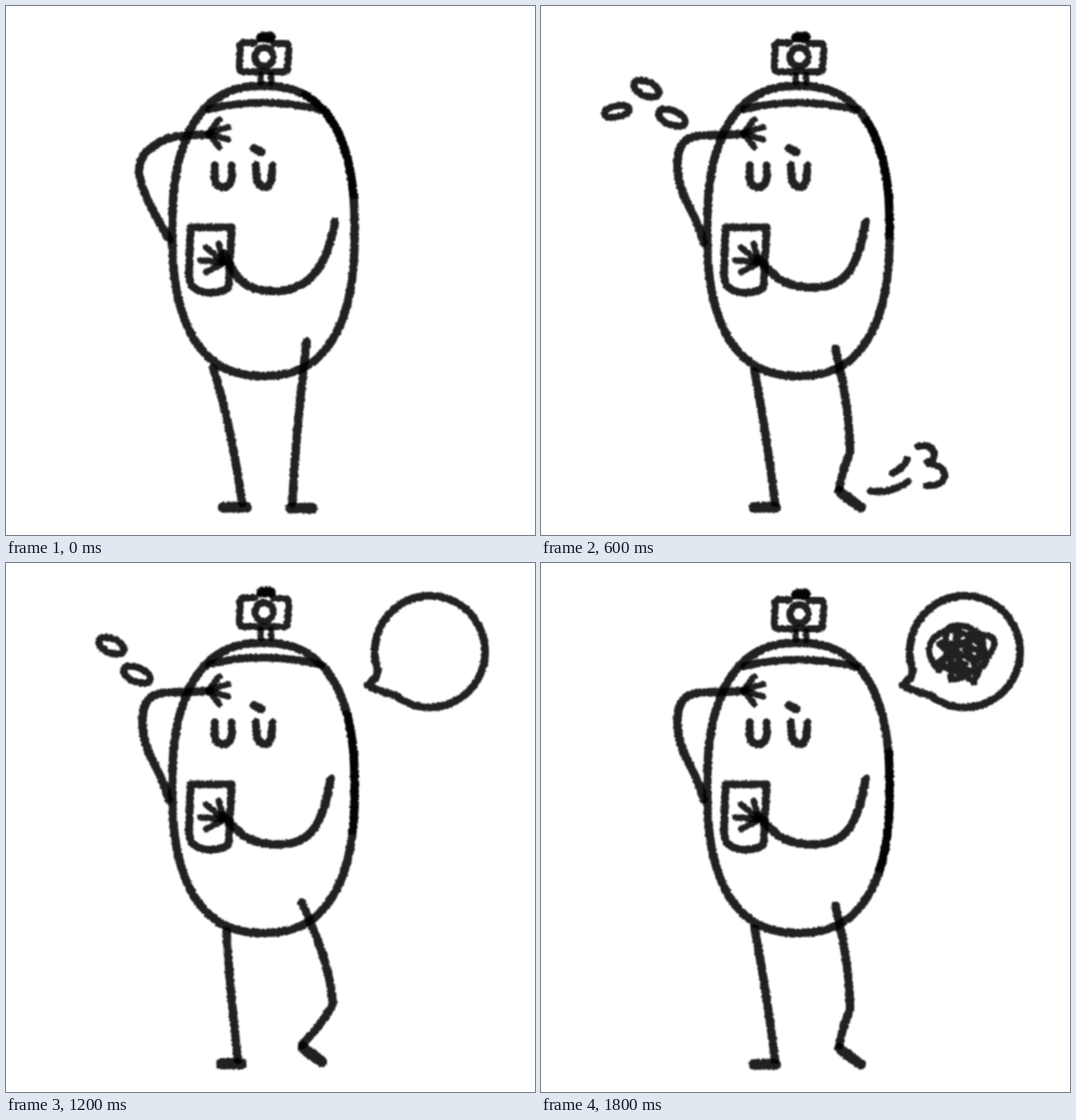
Write an HTML page that moves like this. It is 748 px wide and 748 px high and loops after 2000 ms.

```html
<!DOCTYPE html>
<html>
<head>
<meta charset="utf-8">
<style>
  html, body { margin: 0; height: 100%; overflow: hidden; background: #fff; }
  svg { display: block; width: 100vw; height: 100vh; }
  path { fill: none; stroke: #000; stroke-opacity: .87; stroke-linecap: round; stroke-linejoin: round; }
  .dark { stroke-linecap: butt; }
</style>
</head>
<body>
<svg viewBox="0 0 748 748">
  <filter id="marker" filterUnits="userSpaceOnUse" x="0" y="0" width="748" height="748" color-interpolation-filters="sRGB">
    <feTurbulence type="fractalNoise" baseFrequency=".25" numOctaves="2" seed="4" result="noise"/>
    <feDisplacementMap in="SourceGraphic" in2="noise" scale="4" xChannelSelector="R" yChannelSelector="G"/>
    <feGaussianBlur stdDeviation=".9"/>
  </filter>
  <g id="stage" filter="url(#marker)"></g>
</svg>
<script>
const { PI, sin, cos, sign, abs } = Math;

const line = (d, width = 12, attributes = '') =>
  `<path d="${d}" stroke-width="${width}" ${attributes}/>`;

// Path through samples of a parametric curve, s running from 0 to 1
function curve(point, samples) {
  const points = Array.from({ length: samples + 1 }, (_, i) => point(i / samples));
  return 'M' + points.map(p => p.map(v => v.toFixed(1))).join('L');
}

// Superellipse starting at its left end; n = 2 is a plain ellipse
function ring(x, y, rx, ry, tilt = 0, n = 2) {
  const bend = v => sign(v) * abs(v) ** (2 / n);
  return curve(s => {
    const a = 2 * PI * s + PI, u = rx * bend(cos(a)), v = ry * bend(sin(a));
    return [x + u * cos(tilt) - v * sin(tilt), y + u * sin(tilt) + v * cos(tilt)];
  }, 72);
}

// Four fingers fanned around a direction, the outer ones shorter
function hand(x, y, direction, length) {
  return [-.9, -.3, .3, .9].map(a => {
    const reach = length * cos(a / 1.5);
    return line(`M${x} ${y}l${reach * cos(direction + a)} ${reach * sin(direction + a)}`, 9);
  }).join('');
}

// Loops wound inward
const tangle = (x, y, r, turns) => line(curve(s => {
  const a = 2.7 + s * turns * 2 * PI, shrink = 1 - .75 * s;
  return [x + r * (shrink * cos(a) + .22 * sin(3.4 * a)), y + r * (shrink * sin(a) + .22 * cos(2.6 * a))];
}, 240), 9);

const eye = (x, lean) =>
  line(`M${x} 225l${lean} 20q2 11 ${12 - lean} 11t${12 - lean}-11l${lean}-20`, 11);

const outline = ring(364, 318, 129, 205, 0, 2.45);

const face = eye(295, 0) + eye(353, 2) + line('M351 201l10 6') +
  line('M261 313h58l-4 82q-1 8-20 10t-28-6q-9-4-8-26z', 11);

const head = lift => `<g transform="translate(0 ${-lift})">` +
  line('M352 52H336q-6 0-5 8l-1 26q0 7 7 7h56q5 0 5-6l2-26q0-8-6-8h-16', 10) +
  line(ring(365, 72, 13, 13), 10) + line('M361 44h13', 15) + line('M361 45h13', 13) +
  line('M360 97v12M375 97v12', 9) + line('M287 146Q365 127 446 147', 11) + '</g>';

const arms = {
  out: line('M231 330C190 262 176 228 200 205S250 182 287 182') +
    line('M465 305C452 380 420 405 375 403S325 380 308 350'),
  in: line('M230 335C220 290 192 270 193 222S225 185 287 181') +
    line('M459 305C448 372 430 398 385 398S328 380 307 357')
};
const hands = hand(286, 180, 0, 30) + hand(308, 363, 3.55, 34);

const legs = {
  stand: line('M293 512Q318 590 334 703') + line('M307 709h33', 15) +
    line('M425 475Q409 611 405 703') + line('M402 710h31', 15),
  mid: line('M302 517Q318 600 331 703') + line('M301 709h31', 15) +
    line('M416 484Q437 570 437 632Q426 655 422 682') + line('M422 686q9 8 30 23', 15),
  lift: line('M312 520Q316 600 328 703') + line('M305 708h28', 16) +
    line('M418 480Q460 570 462 624Q448 650 418 682') + line('M420 685q9 8 26 20', 16)
};

const drops = [
  ring(185, 158, 20, 10, .4),
  ring(149, 117, 19, 10, .4),
  ring(107, 149, 18, 8, -.2)
].map(d => line(d, 10));
const bubble = line('M523 162L526 152A78 79 0 1 1 552 188Q530 182 511 173Z', 11);
const puff = line('M497 661Q512 653 518 641M466 686Q497 690 519 672', 10) +
  line('M533 623C555 615 565 640 546 645M548 647C578 649 580 680 545 678', 10);

function scene(step) {
  const pose = step % 2 ? 'mid' : step % 4 || step === 8 ? 'lift' : 'stand';
  const dark = 30 + step * 7 % 16;
  let art = line(outline, 12) + face + head(pose === 'lift' ? 3 : 0) +
    arms[pose === 'stand' ? 'out' : 'in'] + hands + legs[pose] +
    line(outline, 12, `class="dark" pathLength="100" stroke-dasharray="0 ${dark} 16 100"`);
  if (step < 8) art += drops.slice(0, step % 4).join('');
  if (step > 5) art += bubble;
  if (step === 7) art += tangle(595, 128, 25, 3);
  if (step > 7) art += tangle(597, 129, 40, 5);
  if (step === 3 || step === 8) art += puff;
  return art;
}

const stage = document.getElementById('stage');
let shown = -1;
function draw(now) {
  const step = Math.floor(now % 2000 / 200);
  if (step !== shown) stage.innerHTML = scene(shown = step);
  requestAnimationFrame(draw);
}
draw(performance.now());
</script>
</body>
</html>
```
